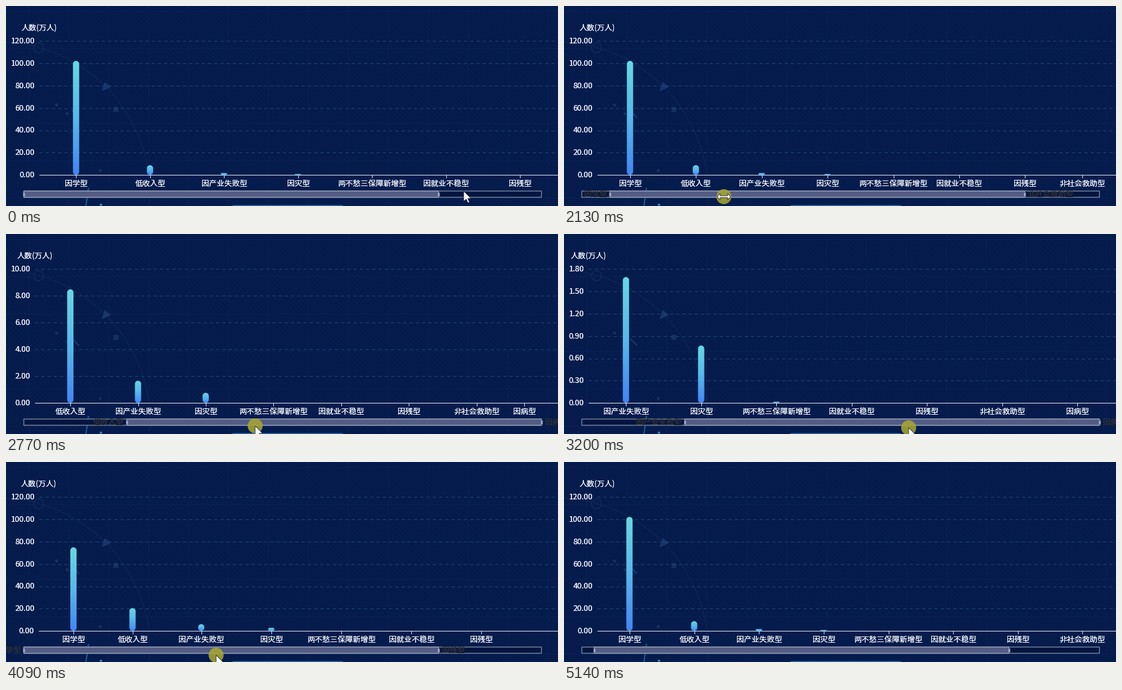
A matplotlib script that plays this animation: 884x321 px, repeating every 6.02 s.

```python
import numpy as np
import matplotlib.pyplot as plt
from matplotlib.animation import FuncAnimation
from matplotlib.colors import LinearSegmentedColormap
from matplotlib.patches import Circle, Polygon, Rectangle, FancyBboxPatch, Arc
from matplotlib.path import Path
from matplotlib.text import Text

W, H, DPI = 884, 321, 100
STEP, FRAMES = 28, 215
LOOP = STEP * FRAMES
PX = 72 / DPI
plt.rcParams["font.family"] = ["Noto Sans CJK JP", "DejaVu Sans"]

NAMES = ["因学型", "低收入型", "因产业失败型", "因灾型", "两不愁三保障新增型",
         "因就业不稳型", "因残型", "非社会救助型", "因病型"]
VALUES = [102.1, 8.68, 1.69, 0.77, 0.015, 0, 0, 0, 0]
BARS = np.count_nonzero(VALUES)
TOP, BASE, RIGHT, BAR_W = 56, 271, 882, 10
TRACK_X, TRACK_Y, TRACK_W, TRACK_H = 28.5, 297, 829, 10
WINDOW_W = TRACK_W * 0.801
PRESS, RELEASE, LEAVE = 1780, 4400, 5140
LAG = 100       # the chart follows the slider this much later, ms
TICK = 2        # resolution of the drag simulation, ms

# pointer: time, x, y
KEYS = np.array([
    (0, 733, 297), (560, 217, 309), (910, 200, 308), (1080, 206, 308),
    (1810, 211, 306), (2130, 256, 306), (2390, 262, 306), (2760, 399, 308),
    (3150, 552, 311), (3632, 552, 311), (3810, 446, 311), (4370, 227, 309),
    (4860, 575, 308), (LEAVE, 711, 318)])


def pointer_at(t):
    return [np.interp(t, KEYS[:, 0], KEYS[:, c]) for c in (1, 2)]


def drag():
    """Slider shift over time: pointer steps add up, clamped to the track."""
    times = np.arange(0, LOOP + TICK, TICK)
    steps = np.diff(pointer_at(times)[0], prepend=KEYS[0, 1])
    shift, out = 0, []
    for t, dx in zip(times, steps):
        if PRESS <= t < RELEASE:
            shift = min(max(shift + dx, 0), TRACK_W - WINDOW_W)
        out.append(shift)
    return out


def zoom_changes(shifts):
    """(time, first, last) for each change of the visible categories."""
    unit = TRACK_W / (len(NAMES) - 1)
    found = []
    for k, s in enumerate(shifts):
        window = round(s / unit), round((s + WINDOW_W) / unit)
        if not found or window != found[-1][1:]:
            found.append((k * TICK + LAG if found else -LOOP, *window))
    return found


SHIFTS = drag()
ZOOMS = zoom_changes(SHIFTS)


def scale(first):
    """Round axis maximum, number of steps and left edge of the plot."""
    raw = max(VALUES[first:]) / 5
    power = 10 ** np.floor(np.log10(raw))
    step = min((1, 2, 3, 5, 10), key=lambda n: abs(n - raw / power)) * power
    count = int(np.ceil(raw * 5 / step))
    return step * count, count, 11 + 7 * len(f"{step * count:.2f}")


def layout(first, last):
    top, _, left = scale(first)
    band = (RIGHT - left) / (last - first + 1)
    goal = {"left": left}
    for i in range(first, last + 1):
        goal["x", i] = left + band * (i - first + 0.5)
        goal["h", i] = VALUES[i] / top * (BASE - TOP)
    return goal


def cubic_out(p):
    return 1 - (1 - min(p, 1)) ** 3


def expo_out(p):
    return 1 - 2 ** (-10 * p) if p < 1 else 1


def chart_state(t):
    """Chart geometry at time t; each zoom starts from where things are."""
    state, leaving, window = {}, {}, None
    for k, (start, first, last) in enumerate(ZOOMS):
        if t < start:
            break
        stop = ZOOMS[k + 1][0] if k + 1 < len(ZOOMS) else t
        age = min(t, stop) - start
        move, grow = cubic_out(age / 300), expo_out(age / 1000)
        goal, new = layout(first, last), {}
        for key, v in goal.items():
            if key in state:
                new[key] = state[key] + (v - state[key]) * move
            else:
                new[key] = v * grow if key[0] == "h" else v
        thin = BAR_W * (1 - cubic_out(age / 200))
        leaving = {i: (state["x", i], state["h", i], thin) for i in range(BARS)
                   if ("x", i) in state and ("x", i) not in goal}
        state, window = new, (first, last)
    return state, leaving, window


def crisp(v):
    """Centre a one pixel line on a pixel row or column."""
    return (np.ceil(round(2 * v) / 2) * 2 - 1) / 2


def pill(x, h, w):
    r = min(w, h) / 2
    a = np.linspace(0, np.pi / 2, 8)
    sx, sy = w / 2 - r, h / 2 - r
    pts = []
    for turn, (kx, ky) in enumerate([(1, 1), (-1, 1), (-1, -1), (1, -1)]):
        b = a + turn * np.pi / 2
        pts.append(np.column_stack([x + kx * sx + r * np.cos(b),
                                    BASE - h / 2 + ky * sy + r * np.sin(b)]))
    pts = np.vstack(pts)
    return Path(np.vstack([pts, pts[:1]]), closed=True)


def backdrop():
    yy, xx = np.mgrid[0:H, 0:W]
    img = np.full((H, W, 3), (5, 27, 75))
    img += (((xx - yy) % 8) < 2)[..., None] * np.array([1, 2, 3])
    img[((xx % 64) == 36) | ((yy % 60) == 8)] += (3, 6, 8)
    return img.astype(np.uint8)


class DenseText(Text):
    """Text drawn twice, which makes thin strokes firmer."""

    def draw(self, renderer):
        super().draw(renderer)
        super().draw(renderer)


fig = plt.figure(figsize=(W / DPI, H / DPI), dpi=DPI, facecolor="#051b4b")
fig.figimage(backdrop(), zorder=-1, origin="upper")
ax = fig.add_axes([0, 0, 1, 1])
ax.axis("off")


def add(patch, z):
    patch.set_zorder(z)
    return ax.add_patch(patch)


def line(color, z, width=1, xs=(), ys=(), **kw):
    return ax.plot(xs, ys, color=color, lw=width * PX, zorder=z,
                   solid_capstyle="butt", **kw)[0]


def label(text="", ha="center", color="#f4f7ff", y=0, size=12.2, z=5):
    return ax.add_artist(DenseText(0, y, text, ha=ha, va="baseline", color=color,
                                   fontsize=size * PX, zorder=z))


# faint ornaments
FAINT = "#15305f"
add(Arc((-15, 303), 492, 492, theta1=-90, theta2=10, ec="#0f2a59", lw=PX), 1)
add(Arc((-10, 272), 300, 336, theta1=-90, theta2=0, ec="#0a2352", lw=PX, ls=":"), 1)
add(Circle((52, 67), 8, fc="none", ec="#112b5a", lw=1.5 * PX), 1)
add(Polygon([(158, 122), (168, 130), (153, 137)], fc="#19366a"), 1)
add(Rectangle((172, 162), 8, 8, fc=FAINT), 1)
for cx, cy in ((81, 159), (98, 173), (151, 264)):
    add(Circle((cx, cy), 2.5, fc=FAINT), 1)
line("#1a386a", 1, 2, (106, 117), (168, 179))
line("#1f5c92", 1, 2, (132, 130, 128), (292, 308, 321))
add(Circle((152, 319), 2, fc="#3a7fb5"), 1)
add(FancyBboxPatch((358, 320.5), 186, 20, boxstyle="round,pad=0,rounding_size=8",
                   fc="#12457f", ec="#3078b8", lw=1.5 * PX), 1)

# axes
splits = [line("#1d4678", 2, linestyle=(0, (5, 5))) for _ in range(6)]
y_labels = [label(ha="right", size=12.7) for _ in range(7)]
axis_line = line("#dbe4f5", 4)
title = label("人数(万人)", y=39)
x_labels = [label(n, y=289) for n in NAMES]
x_ticks = [line("#dbe4f5", 4) for _ in NAMES]

# bars
ramp = LinearSegmentedColormap.from_list("ramp", ["#66d9e3", "#56b9ea", "#4285f4"])
bars = [ax.imshow(np.linspace(0, 1, 128)[:, None], cmap=ramp, aspect="auto",
                  zorder=3, interpolation="nearest") for _ in range(BARS)]

# zoom slider
track = add(Rectangle((TRACK_X, TRACK_Y), TRACK_W, TRACK_H, fc="#04163f",
                      ec="#78839f", lw=1.4 * PX), 6)
filler = add(Rectangle((TRACK_X, TRACK_Y), WINDOW_W, TRACK_H, fc="#535c84",
                       ec="#949db8", lw=1.4 * PX), 7)
for part in (track, filler):
    part.set_snap(False)
knobs = [add(Rectangle((0, 299), 3, 6, fc="#a7b1c8", ec="#5d688a", lw=0.7 * PX), 8)
         for _ in range(2)]
hints = [label(ha=side, color="#333333", y=306, z=9) for side in ("right", "left")]

# pointer
halo = add(Circle((0, 0), 12, fc="#a8a632", alpha=0.88, lw=0), 10)
ARROW = np.array([(0, 0), (0, 16.5), (4, 13), (6.7, 19), (9.2, 18),
                  (6.6, 12), (11.8, 11.8)])
half = np.array([(-11, 0), (-6, -5), (-6, -1.3), (6, -1.3), (6, -5)])
SIZER = np.vstack([half, -half])
pointer = add(Polygon(ARROW, fc="white", ec="#20242c", lw=0.8 * PX), 11)

ax.set_xlim(0, W)
ax.set_ylim(H, 0)


def draw_axes(state, window):
    top, count, left = scale(window[0])
    for k, text in enumerate(y_labels):
        y = BASE - (BASE - TOP) * k / count
        text.set_visible(k <= count)
        text.set_text(f"{top * k / count:.2f}")
        text.set_position(((left if k else state["left"]) - 7, y + 4))
        if k:
            splits[k - 1].set_visible(k <= count)
            splits[k - 1].set_data((left, W), (crisp(y),) * 2)
    axis_line.set_data((state["left"], W), (crisp(BASE),) * 2)
    title.set_x(state["left"] + 0.5)
    for i, (text, tick) in enumerate(zip(x_labels, x_ticks)):
        x = state.get(("x", i))
        text.set_visible(x is not None)
        tick.set_visible(x is not None)
        if x is not None:
            text.set_x(x + 0.5)
            tick.set_data((crisp(x),) * 2, (BASE, BASE + 5))


def draw_bars(state, leaving):
    for i, bar in enumerate(bars):
        if ("x", i) in state:
            x, h, w = state["x", i], state["h", i], BAR_W
        else:
            x, h, w = leaving.get(i, (0, 0, 0))
        shown = h > 0.4 and w > 0.3
        bar.set_visible(shown)
        if shown:
            bar.set_extent((x - w, x + w, BASE + 1, BASE - h - 1))
            bar.set_clip_path(pill(x, h, w), ax.transData)


def draw_slider(t, window, hover):
    left = TRACK_X + SHIFTS[int(t / TICK)]
    right = left + WINDOW_W
    filler.set_x(left)
    for knob, x in zip(knobs, (left, right)):
        knob.set_x(x - 1.5)
    for hint, x, i in zip(hints, (left - 5, right + 5), window):
        hint.set_visible(hover)
        hint.set_text(NAMES[i])
        hint.set_x(x)


def draw(frame):
    # the picture refreshes every 70 ms
    t = max((frame * STEP - 10) // 70 * 70 + 30, 0)
    state, leaving, window = chart_state(t)
    x, y = pointer_at(t)
    pressed = PRESS <= t < RELEASE
    inside = TRACK_Y < y <= TRACK_Y + TRACK_H
    draw_axes(state, window)
    draw_bars(state, leaving)
    draw_slider(t, window, pressed or inside)
    halo.set_visible(pressed)
    halo.center = (x, y)
    pointer.set_xy((SIZER if inside else ARROW) + (x, y))
    pointer.set_visible(t < LEAVE)
    return []


anim = FuncAnimation(fig, draw, frames=FRAMES, interval=STEP,
                     init_func=lambda: draw(0), repeat=True, repeat_delay=0)
plt.show()
```
